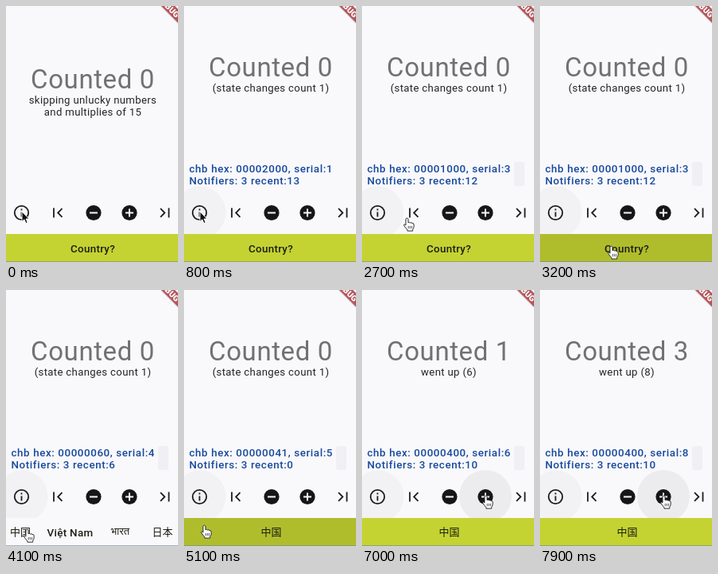
Write an HTML page that moves like this. It is 216 px wide and 320 px high and loops after 8000 ms.

```html
<!DOCTYPE html>
<html lang="en">
<head>
<meta charset="utf-8">
<title>Counter</title>
<style>
  html, body { margin: 0; width: 100%; height: 100%; overflow: hidden; background: #f9f8fb; }
  svg { display: block; width: 216px; height: 320px; font-family: Roboto, "Noto Sans", "Noto Sans CJK SC", "Noto Sans CJK JP", sans-serif; }
  .mid { text-anchor: middle; }
  #count { font-size: 33px; letter-spacing: .6px; fill: #717073; }
  .sub { font-size: 13.2px; letter-spacing: .33px; fill: #252427; }
  .info { font-size: 13.4px; font-weight: 500; letter-spacing: .58px; fill: #174a9c; }
  .bar { font-size: 13.4px; font-weight: 500; letter-spacing: .3px; fill: #1d1e12; }
  .cjk { font-size: 13px; font-weight: 400; letter-spacing: 0; }
  .line { fill: none; stroke: #1d1c1f; stroke-width: 1.8; }
  .solid { fill: #161518; }
  .banner { font-size: 10.2px; font-weight: 900; fill: #fff; }
</style>
</head>
<body>
<svg viewBox="0 0 216 320">
  <rect width="216" height="320" fill="#f9f8fb"/>
  <text id="count" class="mid" x="109"></text>
  <text id="sub1" class="sub mid" x="109"></text>
  <text id="sub2" class="sub mid" x="109" y="137">and multiplies of 15</text>

  <rect id="patch" x="191" y="195" width="13" height="30" rx="3" fill="#f0eff4"/>
  <path id="select" d="M7 195H191V209H7ZM7 211H191V225H7Z" fill="#dfe7f2"/>
  <text id="hex" class="info" x="6.5" y="208"></text>
  <text id="notes" class="info" x="6.5" y="223"></text>

  <circle id="glowInfo" cx="20" cy="258" r="32.5" fill="#f2f1f3"/>
  <circle id="glowPlus" cx="155" cy="258" r="33"/>
  <g transform="translate(19.5 258.5)">
    <circle r="8.7" class="line"/>
    <path d="M0-5V-3M0-1V5" class="line"/>
  </g>
  <path d="M60 252.5V264.5M70.500 253.2L65.200 258.5L70.500 263.8" class="line"/>
  <g transform="translate(110 258.5)">
    <circle r="9.6" class="solid"/>
    <path d="M-5 0H5" stroke="#f9f8fb" stroke-width="2"/>
  </g>
  <g transform="translate(155 258.5)">
    <circle r="9.6" class="solid"/>
    <path d="M-5 0H5M0-5V5" stroke="#f9f8fb" stroke-width="2"/>
  </g>
  <path d="M194 253.2L199.300 258.5L194 263.8M204.500 252.5V264.5" class="line"/>

  <rect id="barBg" y="285" width="216" height="35"/>
  <text id="ask" class="bar mid" x="109" y="308">Country?</text>
  <text id="chosen" class="bar cjk mid" x="109.5" y="307">中国</text>
  <g id="list">
    <text class="bar cjk mid" x="18" y="307">中国</text>
    <text class="bar mid" x="80.5" y="308">Việt Nam</text>
    <text class="bar cjk mid" x="143.5" y="306">भारत</text>
    <text class="bar cjk mid" x="196.5" y="307" lang="ja">日本</text>
  </g>
  <rect y="319" width="216" height="1" fill="#6f8796" opacity=".6"/>

  <g transform="translate(204.5 1) rotate(45)">
    <rect x="-40" y="-6.5" width="80" height="13.5" fill="#000" opacity=".12"/>
    <rect x="-40" y="-6" width="80" height="12" fill="#b4575c"/>
    <text class="banner mid" y="3.7">DEBUG</text>
  </g>

  <g id="cursor">
    <path id="arrow" d="M0 0V12.5L2.9 9.9L5 14.6L7.2 13.6L5.2 9.1H9Z" fill="#111" stroke="#fff"/>
    <g id="hand" stroke="#222" stroke-linejoin="round" transform="translate(-.5 0) scale(.96)">
      <path d="M-1.6 1.2Q0-1 1.6 1.2V6Q3.2 4.9 4.3 6.3Q5.8 5.3 6.8 6.9Q8.7 6.3 9 8.3V11.5Q8.6 13.5 7.5 15V16.8H.5V15.5L-3.8 10.2Q-4.6 8.3-2.9 8.3L-1.6 9.5Z" fill="#fff"/>
      <path d="M1.8 10.3V13.8M4 10.3V13.8M6.2 10.3V13.8" stroke-width=".8"/>
    </g>
  </g>
</svg>
<script>
const LOOP = 8000;
const $ = id => document.getElementById(id);
const show = (id, on) => $(id).setAttribute("visibility", on ? "visible" : "hidden");
const clamp = v => Math.min(1, Math.max(0, v));
const ease = p => p * p * (3 - 2 * p);

// time, pointer x, pointer y
const path = [
  [0, 20, 257], [800, 20, 257], [1400, 42, 215], [2000, 42, 215],
  [2600, 57, 265], [2750, 57, 265], [3200, 90, 300], [3550, 90, 300],
  [4000, 27, 299], [4350, 27, 299], [4700, 26, 294], [5250, 26, 294],
  [6050, 156, 257], [8000, 156, 257]
];

// time, mask, serial, latest notifier
const states = [
  [600, "00002000", 1, 13], [1950, "00002000", 2, 13], [2350, "00001000", 3, 12],
  [3600, "00000060", 4, 6], [4600, "00000041", 5, 0],
  [6700, "00000400", 6, 10], [7200, "00000400", 7, 10], [7650, "00000400", 8, 10]
];

function pointer(t) {
  const i = Math.max(1, path.findIndex(p => p[0] > t));
  const [t0, x0, y0] = path[i - 1], [t1, x1, y1] = path[i];
  const k = ease((t - t0) / (t1 - t0));
  return [x0 + (x1 - x0) * k, y0 + (y1 - y0) * k];
}

function draw(t) {
  const state = states.filter(s => s[0] <= t).pop();
  const serial = state ? state[2] : 0;
  const count = Math.max(0, serial - 5);

  $("count").textContent = "Counted " + count;
  $("count").setAttribute("y", state ? 88 : 103);
  $("sub1").textContent = !state ? "skipping unlucky numbers"
    : count ? `went up (${serial})` : "(state changes count 1)";
  $("sub1").setAttribute("y", state ? 107 : 122);
  show("sub2", !state);
  $("hex").textContent = state ? `chb hex: ${state[1]}, serial:${serial}` : "";
  $("notes").textContent = state ? `Notifiers: 3 recent:${state[3]}` : "";
  show("select", t >= 1300 && t < 1950);
  show("patch", t >= 1950);

  $("glowInfo").setAttribute("opacity", clamp((t - 200) / 300));
  $("glowPlus").setAttribute("opacity", clamp((t - 5900) / 200));
  $("glowPlus").setAttribute("fill", t < 6700 ? "#e5e4e6" : "#ecebee");

  const listed = t >= 3600 && t < 4600;
  const hover = (t >= 3150 && t < 3600) || (t >= 4600 && t < 5400);
  $("barBg").setAttribute("fill", listed ? "#f9f8fb" : hover ? "#afbd2d" : "#c4d332");
  show("ask", t < 3600);
  show("list", listed);
  show("chosen", t >= 4600);

  const [x, y] = pointer(t);
  $("cursor").setAttribute("transform", `translate(${x} ${y})`);
  show("arrow", t < 850);
  show("hand", t >= 850);
}

function tick() {
  draw(performance.now() % LOOP);
  requestAnimationFrame(tick);
}
tick();
</script>
</body>
</html>
```
